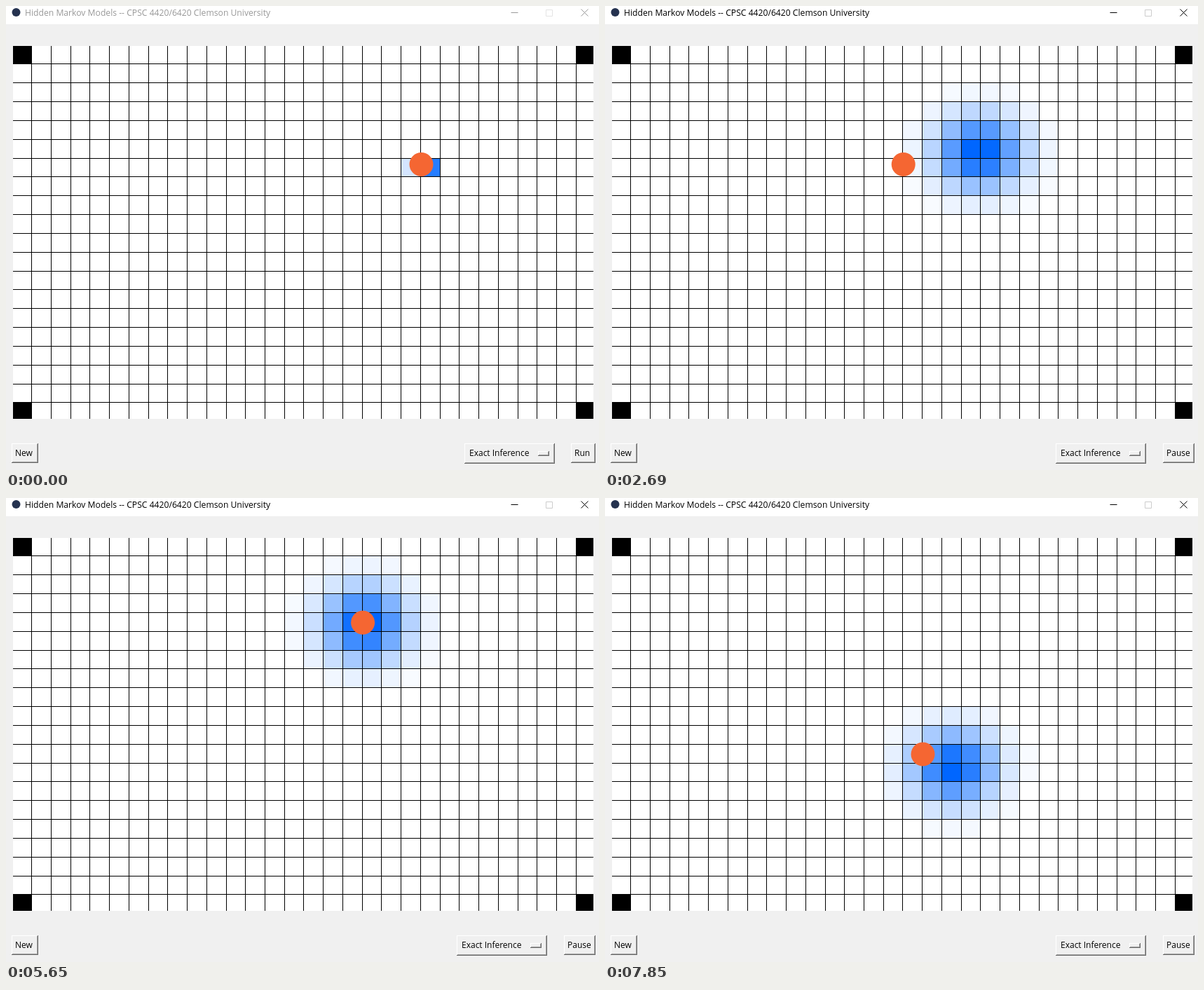
An HTML page that plays this animation: 846 px wide and 662 px high, repeating every 8 s.

```html
<!DOCTYPE html>
<html lang="en">
<head>
<meta charset="utf-8">
<title>Hidden Markov Models</title>
<style>
  html, body { margin: 0; width: 100%; height: 100%; overflow: hidden; background: #f0f0f0; }
  svg { display: block; }
  text { font: 12px "Open Sans", "Noto Sans", sans-serif; white-space: pre; }
</style>
</head>
<body>
<svg id="stage" width="846" height="662" viewBox="0 0 846 662"></svg>
<script>
const LOOP = 8000, COLS = 30, ROWS = 20;
const FOCUS_AT = 520, RUN_AT = 600;
const stage = document.getElementById('stage');

function add(tag, attrs, parent = stage) {
  const node = document.createElementNS('http://www.w3.org/2000/svg', tag);
  for (const key in attrs) node.setAttribute(key, attrs[key]);
  parent.appendChild(node);
  return node;
}
const box = (x, y, width, height, fill, parent) => add('rect', { x, y, width, height, fill }, parent);
function label(x, y, content, parent) {
  const node = add('text', { x, y }, parent);
  node.textContent = content;
  return node;
}
const moveTo = (node, x, y) => node.setAttribute('transform', `translate(${x} ${y})`);

// Linear interpolation through rows of [time, ...values].
function sample(keys, t) {
  const i = keys.findIndex(k => k[0] > t);
  if (i === 0) return keys[0].slice(1);
  if (i < 0) return keys[keys.length - 1].slice(1);
  const a = keys[i - 1], b = keys[i], f = (t - a[0]) / (b[0] - a[0]);
  return a.slice(1).map((v, n) => v + (b[n + 1] - v) * f);
}

const colX = i => Math.min(838, Math.max(10, Math.round(8.4 + 27.74 * i)));
const rowY = i => Math.min(589, Math.max(57, Math.round(55.6 + 26.83 * i)));

// Title bar
box(0, 0, 846, 26, '#fff');
add('circle', { cx: 14.5, cy: 9, r: 6, fill: '#25324f' });
const title = label(27, 13.5, 'Hidden Markov Models -- CPSC 4420/6420 Clemson University');
title.style.fontSize = '12.17px';
const minimize = add('path', { d: 'M720.5 9.5h10' });
const maximize = add('path', { d: 'M770.5 5.5h9v9h-9z', fill: 'none' });
const close = add('path', { d: 'M820.5 4.5l10 10m0-10l-10 10' });

// Belief grid
box(10, 57, 828, 532, '#fff');
const cells = [];
for (let row = 0; row < ROWS; row++) {
  for (let col = 0; col < COLS; col++) {
    const x = colX(col), y = rowY(row);
    const node = box(x, y, colX(col + 1) - x, rowY(row + 1) - y, '#fff');
    const corner = col % (COLS - 1) === 0 && row % (ROWS - 1) === 0;
    if (corner) node.setAttribute('fill', '#000');
    else cells.push({ node, col, row });
  }
}
let gridPath = '';
for (let i = 1; i < COLS; i++) gridPath += `M${colX(i) + .5} 57V589`;
for (let i = 1; i < ROWS; i++) gridPath += `M10 ${rowY(i) + .5}H838`;
add('path', { d: gridPath, stroke: '#000' });
const target = add('circle', { r: 17, fill: '#f56632' });

// Raised buttons
function raised(parent, width, height) {
  box(0, 0, width, height, '#696969', parent);
  box(0, 0, width - 1, height - 1, '#fff', parent);
  box(1, 1, width - 2, height - 2, '#a0a0a0', parent);
  box(1, 1, width - 3, height - 3, '#f0f0f0', parent);
}
function button(x, width, height, content, inset) {
  const group = add('g', {});
  moveTo(group, x, 624);
  raised(group, width, height);
  label(inset, 18, content, group);
  return group;
}
button(8, 38, 28, 'New', 5);
const menu = button(654, 129, 29, 'Exact Inference', 7);
const handle = add('g', { transform: 'translate(105 11)' }, menu);
raised(handle, 16, 7);
const run = button(806, 35, 28, 'Run', 5);
const pause = button(796, 45, 28, 'Pause', 5);

const cursor = add('path', {
  d: 'M.5 .5v14l3.3-3 2.2 5 2.2-1-2.2-4.7h4.5z', fill: '#fff', stroke: '#000'
});

// Time, then position or shape; grid units except for the pointer.
const pointerKeys = [
  [70, 806, 664], [480, 829, 634], [1450, 829, 634], [1800, 850, 638]
];
const targetKeys = [
  [1300, 0, 0], [2600, -6, 0], [2750, -6, 0], [3150, -6, -2], [3550, -4, -2],
  [3800, -4, -3], [3950, -4, -3], [4700, -2, -4], [5300, -1, -4], [5800, -4, -1],
  [6400, -4, 3], [6550, -4, 3], [6800, -2, 4], [7050, -2, 5], [7800, -5, 5]
];
// Centre column, centre row, spread in each direction, peak.
const beliefKeys = [
  [600, 20.8, 6, .43, .3, .85],
  [1200, 20.63, 6, .9, .83, 1],
  [2600, 18.46, 5.2, 1.5, 1.32, 1],
  [3800, 16.6, 4, 1.5, 1.37, 1],
  [4700, 16.85, 3.42, 1.48, 1.35, 1],
  [5400, 18, 3.5, 1.48, 1.35, 1],
  [6400, 16.25, 6.48, 1.48, 1.35, 1],
  [7100, 17.8, 9.4, 1.48, 1.34, 1],
  [7800, 17.12, 11.7, 1.48, 1.32, 1]
];

function drawBelief(t) {
  const [cx, cy, sx, sy, peak] = sample(beliefKeys, t);
  const weight = (col, row) => Math.exp(-(((col - cx) / sx) ** 2 + ((row - cy) / sy) ** 2) / 2);
  const top = weight(Math.round(cx), Math.round(cy));
  for (const { node, col, row } of cells) {
    const p = peak * weight(col, row) / top;
    const v = p < .025 ? 0 : Math.min(1, p);
    node.setAttribute('fill', `rgb(${Math.round(255 - 255 * v)},${Math.round(255 - 153 * v)},255)`);
  }
}

function draw(t) {
  const focused = t >= FOCUS_AT, running = t >= RUN_AT;
  title.setAttribute('fill', focused ? '#000' : '#999');
  minimize.setAttribute('stroke', focused ? '#000' : '#999');
  close.setAttribute('stroke', focused ? '#000' : '#999');
  maximize.setAttribute('stroke', focused ? '#ccc' : '#e4e4e4');

  run.style.display = running ? 'none' : '';
  pause.style.display = running ? '' : 'none';
  moveTo(menu, running ? 643 : 654, 624);

  const [px, py] = sample(pointerKeys, t);
  moveTo(cursor, Math.round(px), Math.round(py));

  const tick = Math.floor(t / 100) * 100;
  drawBelief(tick);
  const [col, row] = sample(targetKeys, tick).map(Math.round);
  const drop = tick < 4400 ? 0 : .2;
  moveTo(target, 592.5 + 27.8 * col, 226 + 26.83 * (row + drop));
}

let start;
function frame(now) {
  start ??= now;
  draw((now - start) % LOOP);
  requestAnimationFrame(frame);
}
draw(0);
requestAnimationFrame(frame);
</script>
</body>
</html>
```
